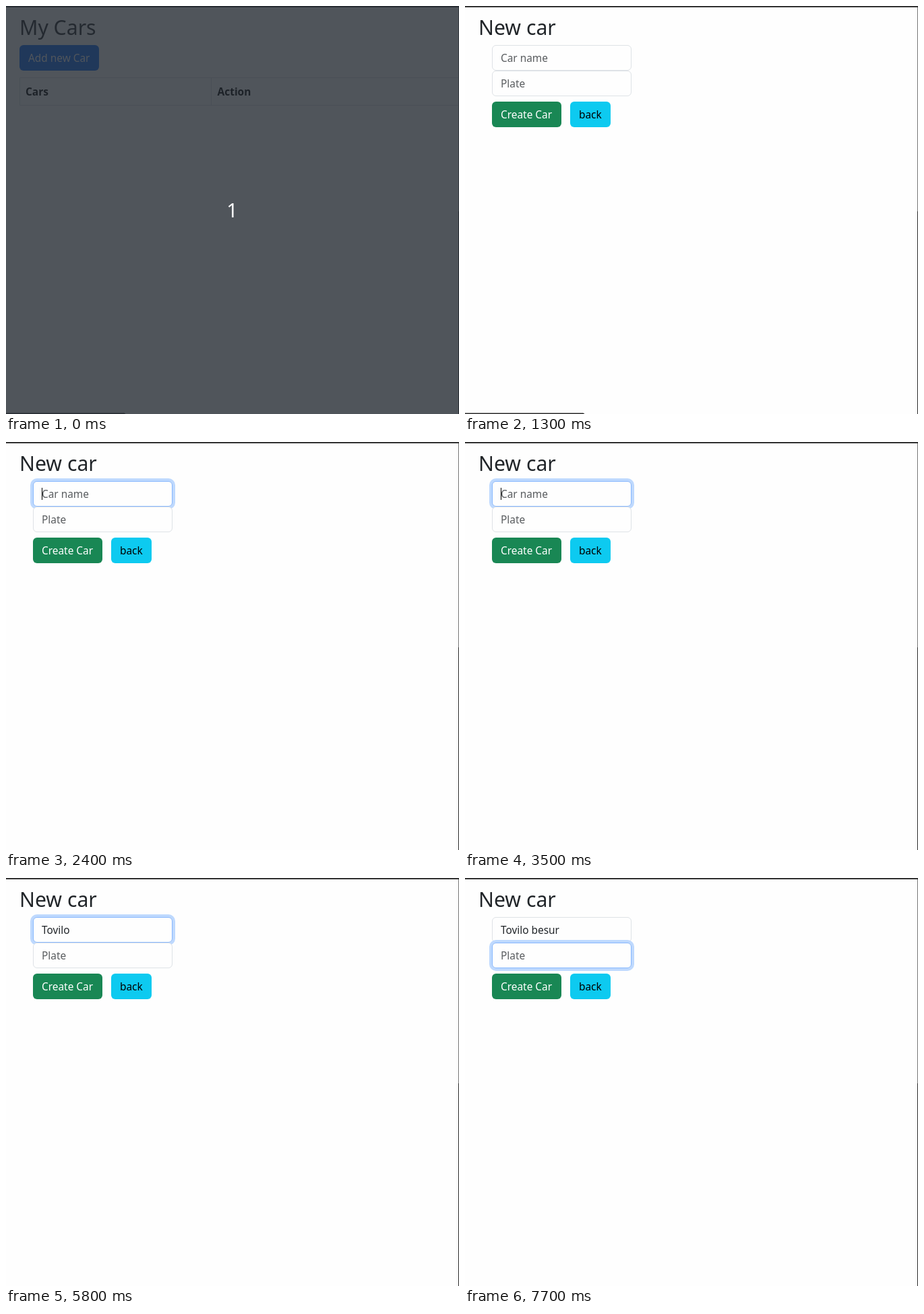
Recreate the animation shown at these times as an HTML page. Size 672x606 px, loop 8000 ms.

```html
<!DOCTYPE html>
<html lang="en">
<head>
<meta charset="utf-8">
<title>Car form</title>
<style>
  html, body { margin: 0; width: 672px; height: 606px; overflow: hidden; background: #fefefe; }
  svg { display: block; }
  text { font: 15.4px Ubuntu, "Noto Sans", "Open Sans", sans-serif; fill: #212529; }
  .title { font-size: 30.2px; font-weight: 500; }
  .head { font-size: 15.5px; font-weight: 700; fill: #000; }
  .light { fill: #fff; }
  .dark { fill: #000; }
  .hint { fill: #595c5f; }
  .count { font-size: 29px; fill: #fff; text-anchor: middle; }
  .grid { fill: none; stroke: #dee2e6; }
  .field { fill: #fefefe; stroke: #dee2e6; }
  .glow { fill: #bed9fe; }
  .active { fill: #fefefe; stroke: #86b7fe; }
  .caret { fill: #000; }
</style>
</head>
<body>
<svg width="672" height="606" viewBox="0 0 672 606">
  <rect width="672" height="606" fill="#fefefe"/>

  <g id="list">
    <text class="title" x="20" y="43">My Cars</text>
    <rect x="20" y="58" width="118" height="38" rx="6" fill="#0d6efd"/>
    <text class="light" x="33" y="83">Add new Car</text>
    <path class="grid" d="M671 106.5H20.5V147.5H671M304.5 106V148"/>
    <text class="head" x="29" y="133">Cars</text>
    <text class="head" x="313.5" y="133">Action</text>
  </g>

  <g id="form">
    <text class="title" x="20" y="43">New car</text>
    <g id="name"></g>
    <g id="plate"></g>
    <rect x="40" y="142" width="103" height="38" rx="6" fill="#198754"/>
    <text class="light" x="53" y="167">Create Car</text>
    <rect x="156" y="142" width="60" height="38" rx="6" fill="#0dcaf0"/>
    <text class="dark" x="169" y="167">back</text>
  </g>

  <rect width="672" height="2" fill="#363636"/>
  <rect x="671" y="2" width="1" height="303" fill="#777"/>
  <rect x="671" y="305" width="1" height="301" fill="#2a2a2a"/>
  <path id="status" d="M0 604.6H175.5L177.5 606H0Z" fill="#2b2b2b"/>

  <g id="countdown">
    <rect width="672" height="606" fill="#252b32" fill-opacity=".8"/>
    <text class="count" x="335.5" y="314">1</text>
  </g>
</svg>
<script>
const LOOP = 8000;
const FORM_AT = 1300, NAME_FOCUS = 2250, PLATE_FOCUS = 7050, FADE = 150;
const WORD = 'Tovilo', GAP = '\u00a0';

// [start time, value]
const typed = [
  [0, ''], [3700, 'T'], [3900, 'Tv'], [4000, 'Tvo'], [4400, 'Tv'], [4600, 'T'],
  [4700, 'To'], [4800, 'Tov'], [4900, 'Tovi'], [5000, 'Tovil'], [5200, WORD],
  [5900, WORD + GAP], [6300, WORD + GAP + 'b'], [6400, WORD + GAP + 'be'],
  [6600, WORD + GAP + 'besu'], [6800, WORD + GAP + 'besur']
];
const nameCaret = [[0, 0], [2300, 1], [2900, 0], [3500, 1], [5800, 0], [5900, 1], [7100, 0]];
const plateCaret = [[0, 0], [7100, 1], [7700, 0]];
const statusBar = [[0, 1], [1800, .5], [1900, 0]];

const $ = id => document.getElementById(id);
const show = (el, on) => el.setAttribute('opacity', Number(on));

function at(steps, t) {
  let value = steps[0][1];
  for (const [start, v] of steps) if (t >= start) value = v;
  return value;
}

function ramp(t, start) {
  const p = Math.min(1, Math.max(0, (t - start) / FADE));
  return p * p * (3 - 2 * p);
}

function makeField(id, y, hint) {
  const box = 'x="40.5" width="206" height="37" rx="5.5"';
  const g = $(id);
  g.innerHTML = `
    <rect class="glow" x="36" y="${y - 4}" width="215" height="46" rx="10"/>
    <rect class="field" ${box} y="${y + .5}"/>
    <rect class="active" ${box} y="${y + .5}"/>
    <text x="53" y="${y + 25}"></text>
    <path fill="none" stroke="#e33" stroke-width="1"/>
    <rect class="caret" x="53" y="${y + 10}" width="1" height="18"/>`;
  const [glow, , active, text, wave, caret] = g.children;
  return {
    wave,
    draw(value, focus, caretOn) {
      show(glow, focus);
      show(active, focus);
      text.textContent = value || hint;
      text.setAttribute('class', value ? '' : 'hint');
      const end = value ? text.getComputedTextLength() : 0;
      caret.setAttribute('x', 53 + Math.round(end));
      show(caret, caretOn);
    },
    underline(word) {
      text.textContent = word;
      const bumps = Math.floor(text.getComputedTextLength() / 2);
      wave.setAttribute('d', `M53 ${y + 29.5}q1 -2 2 0` + 't2 0'.repeat(bumps - 1));
    }
  };
}

const nameField = makeField('name', 58, 'Car name');
const plateField = makeField('plate', 96, 'Plate');
nameField.underline(WORD);

function render(t) {
  const onForm = t >= FORM_AT;
  show($('list'), !onForm);
  show($('form'), onForm);
  show($('countdown'), t < 100);
  show($('status'), at(statusBar, t));

  const moved = ramp(t, PLATE_FOCUS);
  nameField.draw(at(typed, t), ramp(t, NAME_FOCUS) * (1 - moved), at(nameCaret, t));
  show(nameField.wave, t >= 6000 && t < 7100);
  plateField.draw('', moved, at(plateCaret, t));
}

const begin = performance.now();
function tick() {
  render((performance.now() - begin) % LOOP);
  requestAnimationFrame(tick);
}
tick();
</script>
</body>
</html>
```
